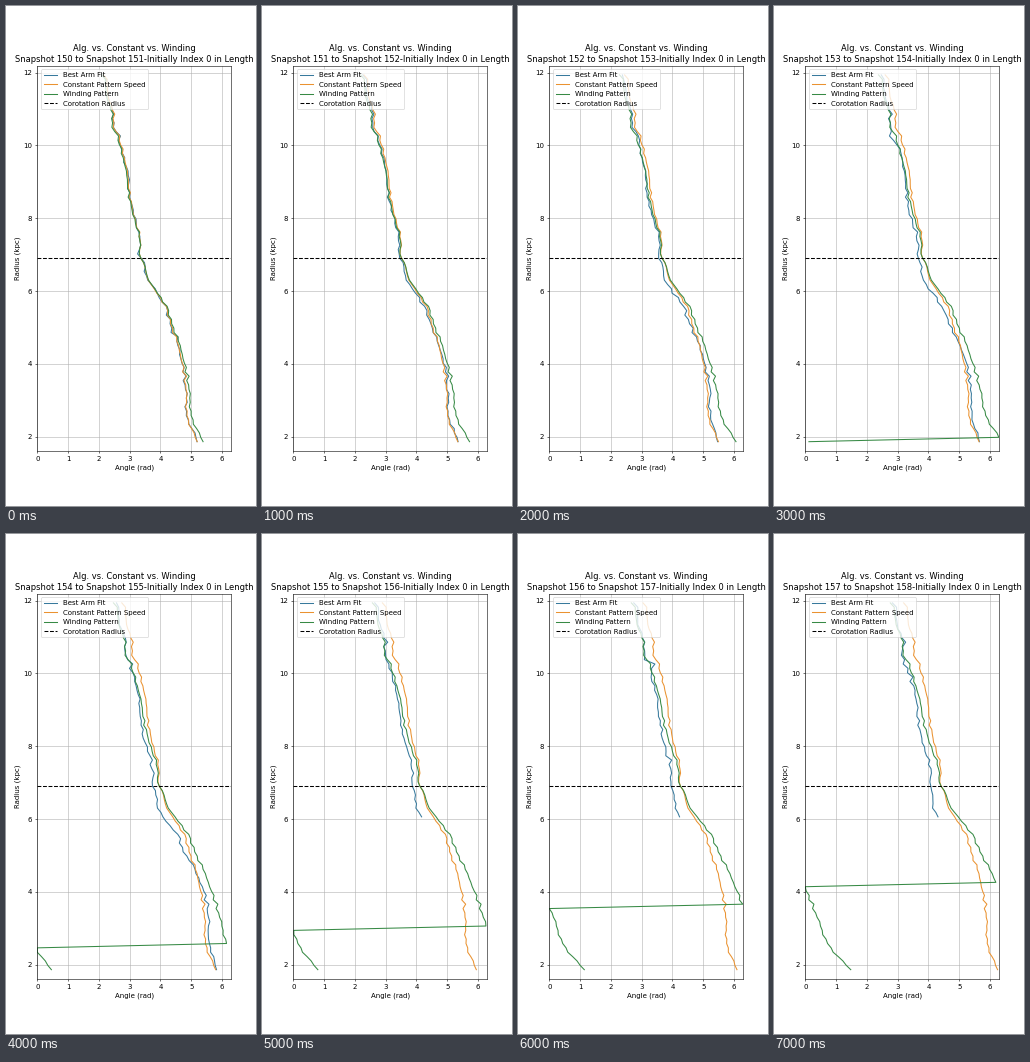
Recreate the animation shown at these times as a matplotlib script. Size 250x500 px, loop 8000 ms.

```python
import numpy as np
import matplotlib.pyplot as plt
from matplotlib.animation import FuncAnimation

plt.rcParams["font.family"] = "DejaVu Sans"

FRAMES = 8
TWO_PI = 2 * np.pi
X_MAX = 6.29
Y_MIN, Y_MAX = 1.604, 12.184
COROTATION = 6.9
PATTERN_SPEED = 0.15
BLUE, ORANGE, GREEN = "#37799c", "#ea9230", "#378a45"

radius = 1.86 + 0.12 * np.arange(85)


def profile(points):
    """Value at every radius from a few (radius, value) points."""
    return np.interp(radius, *np.transpose(points))


def jitter(seed, size):
    return np.random.default_rng(seed).normal(0, size, radius.size)


# Angle of the spiral arm at the start
base = profile([
    (1.86, 5.06), (2.15, 4.87), (2.59, 4.72), (3.67, 4.64), (4.32, 4.50),
    (5.20, 4.16), (5.53, 4.08), (6.17, 3.53), (7.05, 3.17), (7.27, 3.23),
    (8.56, 2.86), (9.44, 2.73), (10.15, 2.54), (10.60, 2.29),
    (10.86, 2.34), (11.94, 2.02)]) + jitter(4, 0.025)

# Per-step drift of the fitted arm from the constant pattern
drift = profile([(1.86, 0), (2.2, 0.03), (4, 0.03), (5.3, -0.05),
                 (6.1, -0.08), (7, -0.045), (8, -0.054), (12, -0.05)])
roughness = 0.015 * np.exp(-((radius - 10.2) / 0.25) ** 2)


def constant(step):
    return base + PATTERN_SPEED * (step + 1)


def best_fit(step):
    noise = jitter(20 + step, 0.02 + step * roughness)
    angle = constant(step) + drift * step + noise
    if step >= 5:  # the inner arm is no longer found
        angle[radius < 6.05] = np.nan
    return angle


def winding(step):
    angle = base + 1.345 / (radius + 2.1) * (step + 1)
    wrap_radius = 2.5 + 0.55 * (step - 4)
    angle[radius < wrap_radius] -= TWO_PI
    return np.clip(angle, 0, TWO_PI)


fig, ax = plt.subplots(figsize=(5, 10), dpi=50)
fit_line, = ax.plot([], [], color=BLUE, label="Best Arm Fit")
constant_line, = ax.plot([], [], color=ORANGE, label="Constant Pattern Speed")
winding_line, = ax.plot([], [], color=GREEN, label="Winding Pattern")
ax.axhline(COROTATION, color="black", linestyle="--",
           label="Corotation Radius")
ax.set(xlim=(0, X_MAX), ylim=(Y_MIN, Y_MAX),
       xlabel="Angle (rad)", ylabel="Radius (kpc)",
       xticks=range(7), yticks=range(2, 13, 2))
ax.grid(True)
ax.legend(loc="upper left")
title = ax.set_title("")


def update(step):
    fit_line.set_data(best_fit(step), radius)
    constant_line.set_data(constant(step), radius)
    winding_line.set_data(winding(step), radius)
    title.set_text("Alg. vs. Constant vs. Winding\n"
                   f"Snapshot {150 + step} to Snapshot {151 + step}"
                   "-Initially Index 0 in Length")
    return fit_line, constant_line, winding_line, title


anim = FuncAnimation(fig, update, frames=FRAMES, interval=1000, repeat=True)
plt.show()
```
